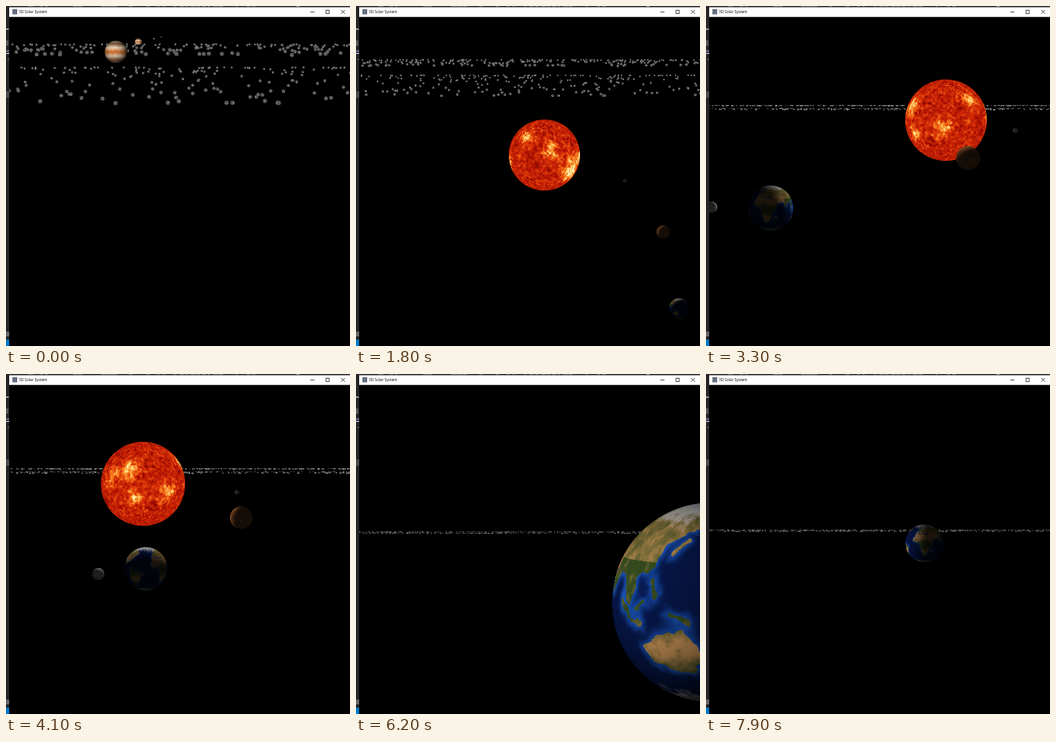
Write an HTML page with a canvas that moves like this. It is 430 px wide and 426 px high and loops after 8000 ms.

```html
<!DOCTYPE html>
<html lang="en">
<head>
<meta charset="utf-8">
<title>3D Solar System</title>
<style>
html, body { margin: 0; width: 100%; height: 100%; overflow: hidden; background: #000; }
canvas { position: absolute; left: 0; top: 0; }
#title { position: absolute; left: 16px; top: 4px; font: 4.7px/7px "Open Sans", "Noto Sans", sans-serif; color: #000; white-space: nowrap; }
</style>
</head>
<body>
<canvas id="stage" width="430" height="426"></canvas>
<div id="title">3D Solar System</div>
<script>
const W = 430, H = 426, TW = 720, TH = 360, LOOP = 8000, STEP = 100;
const ctx = document.getElementById('stage').getContext('2d');
const buffer = document.createElement('canvas');
buffer.width = W;
buffer.height = H;
const bctx = buffer.getContext('2d');

const clamp = (v, a = 0, b = 1) => Math.min(b, Math.max(a, v));
const mix = (a, b, t) => a + (b - a) * t;
const blend = (a, b, t) => a.map((v, i) => mix(v, b[i], t));
const mod = (v, n) => ((v % n) + n) % n;
const hash = (a, b) => {
  const s = Math.sin(a * 127.1 + b * 311.7) * 43758.5453;
  return s - Math.floor(s);
};

// Value noise that wraps around every `cells` columns.
function noise(u, v, cells) {
  const x = u * cells, y = v * cells / 2;
  const i = Math.floor(x), j = Math.floor(y);
  const fx = x - i, fy = y - j;
  const a = i % cells, b = (i + 1) % cells;
  return mix(mix(hash(a, j), hash(b, j), fx), mix(hash(a, j + 1), hash(b, j + 1), fx), fy);
}

function ramp(stops, t) {
  const p = clamp(t) * (stops.length - 1);
  const i = Math.min(stops.length - 2, Math.floor(p));
  return blend(stops[i], stops[i + 1], p - i);
}

// shade(u, v, lon, lat) gives one colour of a world map
function texture(shade) {
  const data = new Uint8ClampedArray(TW * TH * 3);
  for (let j = 0, k = 0; j < TH; j++) {
    for (let i = 0; i < TW; i++, k += 3) {
      const u = i / TW, v = j / TH;
      data.set(shade(u, v, u * 360 - 180, 90 - v * 180), k);
    }
  }
  return data;
}

// lon, lat of the bright regions
const spots = [[2, 33], [-48, -9], [48, 9], [83, -17], [112, -4], [100, -32], [-126, 6], [-95, -20], [-102, 19]];
const fire = [[60, 0, 0], [160, 12, 2], [212, 44, 6], [248, 125, 28], [255, 212, 115], [255, 240, 190]];
const sunTex = texture((u, v, lon, lat) => {
  const grain = .6 * noise(u, v, 104) + .4 * noise(u, v, 208);
  const cloud = noise(u, v, 40);
  let glow = 0;
  for (const [a, b] of spots) {
    const dx = (mod(lon - a + 180, 360) - 180) * Math.cos(lat * Math.PI / 180);
    glow += Math.exp(-(dx * dx + (lat - b) ** 2) / 190);
  }
  return ramp(fire, .02 + .5 * grain + .1 * cloud + glow * (.12 + .5 * cloud * (.5 + grain)));
});

// Rough outlines in lon, lat; noise roughens the coasts.
const eurasia = [-8,38, 5,56, 25,70, 100,76, 178,67, 158,55, 138,52, 121,38, 120,27, 108,19, 103,3, 97,17, 89,22, 78,9, 70,23, 45,14, 35,36];
const africa = [-16,15, -6,34, 32,30, 50,11, 39,-10, 27,-33, 18,-33, 9,4];
const australia = [115,-23, 131,-13, 143,-13, 152,-27, 147,-37, 117,-33];
const northAmerica = [-160,64, -85,70, -60,50, -81,28, -98,18, -123,42];
const southAmerica = [-77,6, -37,-7, -68,-52, -79,-5];
const islands = [
  [111,0, 116,4], [97,4, 104,-4], [107,-7, 114,-8], [134,-3, 147,-7], [121,17, 125,8], [132,34, 141,42], [45,-22, 49,-15]
];

function landMask() {
  const c = document.createElement('canvas');
  c.width = TW;
  c.height = TH;
  const g = c.getContext('2d');
  const shapes = [eurasia, africa, australia, northAmerica, southAmerica, ...islands].map(pts => {
    const p = new Path2D();
    for (let i = 0; i < pts.length; i += 2) p.lineTo((pts[i] + 180) * 2, (90 - pts[i + 1]) * 2);
    p.closePath();
    return p;
  });
  g.fillStyle = '#000';
  g.fillRect(0, 0, TW, TH);
  g.lineJoin = g.lineCap = 'round';
  g.lineWidth = 16;
  g.strokeStyle = '#0f0';
  g.filter = 'blur(4px)';
  shapes.forEach(p => g.stroke(p));
  g.filter = 'none';
  g.lineWidth = 6;
  g.fillStyle = g.strokeStyle = '#ff0';
  shapes.forEach(p => { g.fill(p); g.stroke(p); });
  return g.getImageData(0, 0, TW, TH).data;
}

const mask = landMask();
const earthTex = texture((u, v, lon, lat) => {
  const n = .5 * noise(u, v, 60) + .3 * noise(u, v, 120) + .2 * noise(u, v, 240);
  const warp = cells => (noise(u, v, cells) - .5) * 9;
  const mx = Math.round(mod(u * TW + warp(70), TW)) % TW;
  const my = clamp(Math.round(v * TH + warp(84)), 0, TH - 1);
  const k = (my * TW + mx) * 4;
  const sea = blend([6, 22, 72], [28, 92, 200], clamp(mask[k + 1] / 255 * (.55 + .6 * n)));
  const desert = lon < 75 || lat < 0 ? Math.exp(-(((Math.abs(lat) - 23) / 11) ** 2)) : 0;
  const steppe = lat > 28 ? .55 : 0;
  const land = blend([52, 74, 30], [205, 150, 88], clamp(desert + steppe + (n - .5) * 1.1));
  const ice = clamp((Math.abs(lat) - 56 + (n - .5) * 30) / 12);
  return blend(mask[k] > 128 ? land : sea, [190, 190, 190], ice * .9);
});

const rock = (...tint) => texture((u, v) => {
  const n = .6 + .6 * (.6 * noise(u, v, 24) + .4 * noise(u, v, 60));
  return tint.map(c => c * n);
});
const greyTex = rock(150, 150, 152);
const venusTex = rock(176, 104, 52);

const bands = [
  [80, 70, 62], [195, 168, 140], [140, 96, 66], [238, 215, 185], [205, 105, 38],
  [240, 218, 190], [165, 105, 62], [205, 175, 145], [80, 70, 64]
];
const gasTex = texture((u, v) => ramp(bands, v + (noise(u, v, 40) - .5) * .04));

// Draws a lit ball; without a light it glows evenly.
function ball([x, y, r], tex, lon = 0, tilt = 0, light = null, ambient = .15) {
  const x0 = Math.max(0, Math.floor(x - r - 1)), x1 = Math.min(W, Math.ceil(x + r + 1));
  const y0 = Math.max(0, Math.floor(y - r - 1)), y1 = Math.min(H, Math.ceil(y + r + 1));
  if (x1 <= x0 || y1 <= y0) return;
  const w = x1 - x0, h = y1 - y0;
  const img = bctx.createImageData(w, h);
  const c = Math.cos(tilt), s = Math.sin(tilt);
  for (let j = 0; j < h; j++) {
    for (let i = 0; i < w; i++) {
      let dx = (x0 + i + .5 - x) / r, dy = (y0 + j + .5 - y) / r;
      const d = Math.hypot(dx, dy);
      const alpha = clamp((1 - d) * r + .5);
      if (!alpha) continue;
      if (d > 1) { dx /= d; dy /= d; }
      const nz = Math.sqrt(Math.max(0, 1 - dx * dx - dy * dy));
      const lat = Math.asin(clamp(nz * s - dy * c, -1, 1));
      const lng = Math.atan2(dx, nz * c + dy * s) * 180 / Math.PI + lon;
      const tx = Math.floor(mod(lng + 180, 360) * TW / 360) % TW;
      const ty = clamp(Math.floor((.5 - lat / Math.PI) * TH), 0, TH - 1);
      const k = (ty * TW + tx) * 3, o = (j * w + i) * 4;
      const lit = light ? ambient + (1 - ambient) * Math.max(0, dx * light[0] + dy * light[1] + nz * light[2]) : 1;
      for (let q = 0; q < 3; q++) img.data[o + q] = tex[k + q] * lit;
      img.data[o + 3] = alpha * 255;
    }
  }
  bctx.putImageData(img, 0, 0);
  ctx.drawImage(buffer, 0, 0, w, h, x0, y0, w, h);
}

const times = [0, 1100, 2500, 3300, 5000, 6200, 7900];
const enter = r => [760, 720, r];
const leave = r => [-90, 200, r];
// x, y, radius at each time
const sunPath = [[430,560,42], [132.5,142,44.5], [338.5,231.5,44.5], [300,143,51], [26.5,131.5,54.5], [-230,60,62], [-400,150,50]];
const mercuryPath = [enter(1.3), [269.5,197,1.6], [403.5,241,2.6], [387,156,3], [178.5,139.5,2.5], leave(3), leave(3)];
const venusPath = [enter(6), [407,305,6.8], [361.5,262,10.5], [327.5,190.5,15], [256.5,168,13], leave(16), leave(10)];
const moonPath = [enter(3), [600,480,3], [287,290,4], [7,252,7], [237,249,8], leave(22), leave(8)];
const earthPath = [enter(10), [560,470,11], [248,288,14.5], [81,253,28], [280,234,26], [445,286,125], [273,212,23.5]];
const earthDepth = [-.6, -.6, -.7, -.35, -.5, .75, .05];
// top, gap between layers, spread, size, count per layer, pan
const belt = [
  [48,29,45,2.7,165,0], [-78,35,50,2.7,165,-120], [212.8,3.6,2,.9,330,60], [124.5,3.6,1.8,.95,330,20],
  [111.8,4,2.5,.95,330,-250], [197.8,1.2,.8,.7,340,-600], [195.6,1,.8,.7,340,-900]
];

function place(path, seg, f) {
  const a = path[seg], b = path[seg + 1];
  const r = a[2] * Math.pow(b[2] / a[2], f);
  // a strong zoom carries the position along with the size
  const p = Math.abs(b[2] - a[2]) > 20 ? (r - a[2]) / (b[2] - a[2]) : f;
  return [mix(a[0], b[0], p), mix(a[1], b[1], p), r];
}

function lightFrom(sun, body, depth) {
  const dx = sun[0] - body[0], dy = sun[1] - body[1];
  const d = Math.hypot(dx, dy) || 1, n = Math.hypot(1, depth);
  return [dx / d / n, dy / d / n, depth / n];
}

function drawBelt([top, gap, spread, size, count, pan]) {
  for (let layer = 0; layer < 2; layer++) {
    for (let i = 0; i < count; i++) {
      const v = Math.pow(hash(i, layer + 3), 2.3);
      const x = 4 + mod(hash(i, layer + 11) * 430 + pan, 430);
      const y = top + layer * gap + v * spread * (layer ? 1 : .3);
      const r = size * (.5 + .5 * v);
      if (size < 1.3) {
        const g = Math.round(85 + hash(i, layer + 21) * 100);
        box(`rgb(${g},${g},${g})`, x - r, y - r * .7, r * 2, r * 1.5);
        continue;
      }
      ctx.fillStyle = '#555';
      ctx.beginPath();
      ctx.arc(x, y, r, 0, 7);
      ctx.fill();
      for (let k = 0; k < 5; k++) {
        const a = hash(i, k + 31) * 6.28, d = r * .75 * hash(i, k + 41);
        box(k % 2 ? '#2a2a2a' : '#aaa', x + Math.cos(a) * d - .4, y + Math.sin(a) * d - .4, .9, .9);
      }
    }
  }
}

function box(color, x, y, w, h) {
  ctx.fillStyle = color;
  ctx.fillRect(x, y, w, h);
}

function drawWindow() {
  box('#252528', 0, 0, 4, H);
  box('#252528', 0, 0, W, 1.5);
  for (let i = 0; i < 42; i++) {
    if (hash(i, 5) > .35) box('#77777c', 28 + i * 7, 0, 2 + hash(i, 6) * 5, .8);
  }
  box('#aaa', 363, 0, 4, .8);
  box('#999', 0, 28, 3.5, 2);
  box('#555', 0, 43, 3, 7);
  box('#77709e', 0, 55.5, 4, 2);
  box('#ddd', 0, 59, 4, 1);
  box('#777', 2, 66, 1.5, 1.5);
  box('#4b4b50', 0, 107, 4, 8);
  box('#68686c', 0, 408, 4, 6);
  box('#007acc', 0, 418, 4, 8);
  box('#fff', 4, 1.5, W - 4, 12.2);
  box('#667080', 8, 4, 6, 6.5);
  box('#222', 380.5, 7, 5, .8);
  ctx.strokeStyle = '#222';
  ctx.lineWidth = .8;
  ctx.strokeRect(400, 5.2, 4, 4.2);
  ctx.beginPath();
  ctx.moveTo(419, 5);
  ctx.lineTo(423.6, 9.6);
  ctx.moveTo(423.6, 5);
  ctx.lineTo(419, 9.6);
  ctx.stroke();
}

function draw(t) {
  let seg = 0;
  while (seg < times.length - 2 && t >= times[seg + 1]) seg++;
  const f = (t - times[seg]) / (times[seg + 1] - times[seg]);
  const sec = t / 1000;
  box('#000', 0, 0, W, H);
  drawBelt(blend(belt[seg], belt[seg + 1], f));

  if (seg === 0) {
    const up = -205 * f, side = 14 * f, front = [-.25, -.2, .95];
    ball([165.5 + side, 45 + up, 4.6], gasTex, 0, 0, front);
    ball([137.5 + side, 57.5 + up, 14.2], gasTex, -sec * 60, 0, front, .1);
    ball([185 + side, 41 + up, .9], greyTex);
    ball([194 + side, 39 + up, .6], greyTex);
  }

  const sun = place(sunPath, seg, f), earth = place(earthPath, seg, f);
  const rocky = (path, tex, ambient) => {
    const body = place(path, seg, f);
    ball(body, tex, -sec * 40, 0, lightFrom(sun, body, -.5), ambient);
  };
  ball(sun, sunTex, -52 * (sec - 2.5));
  rocky(mercuryPath, greyTex, .2);
  rocky(venusPath, venusTex, .13);
  rocky(moonPath, greyTex, .22);
  const depth = mix(earthDepth[seg], earthDepth[seg + 1], f);
  ball(earth, earthTex, 160 - 81 * (sec - 6.2), .1, lightFrom(sun, earth, depth), .14);
  drawWindow();
}

let last = -1;
function frame(now) {
  const t = Math.floor((now % LOOP) / STEP) * STEP;
  if (t !== last) {
    last = t;
    draw(t);
  }
  requestAnimationFrame(frame);
}
draw(0);
requestAnimationFrame(frame);
</script>
</body>
</html>
```
